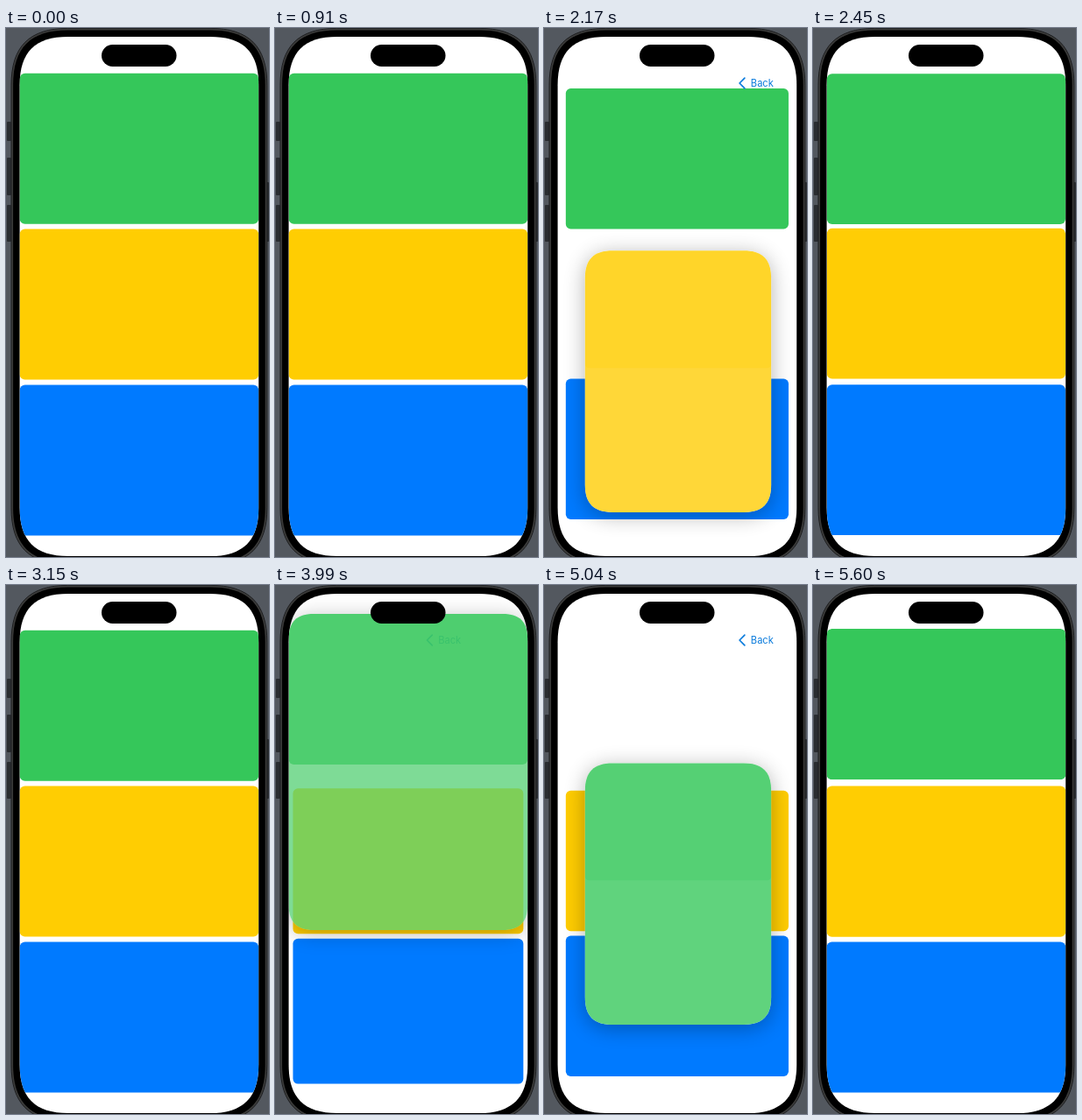
An HTML page that plays this animation: 300 by 604 pixels, repeating every 5670 ms.

```html
<!DOCTYPE html>
<html lang="en">
<head>
<meta charset="utf-8">
<title>Zoom transition</title>
<style>
  html, body { margin: 0; width: 100%; height: 100%; overflow: hidden; background: #53585f; }
  svg { display: block; width: 300px; height: 604px; }
  text { font: 11.1px Inter, Roboto, sans-serif; }
</style>
</head>
<body>
<svg viewBox="0 0 300 604">
  <defs>
    <clipPath id="screenClip"><path class="screen"/></clipPath>
    <clipPath id="cardClip"><path class="card"/></clipPath>
    <clipPath id="outsideClip"><path id="outside" clip-rule="evenodd"/></clipPath>
    <filter id="blur" filterUnits="userSpaceOnUse" x="-60" y="-60" width="420" height="780">
      <feGaussianBlur stdDeviation="12"/>
    </filter>
  </defs>

  <rect width="300" height="604" fill="#53585f"/>
  <g fill="#2a2d31">
    <rect x="1" y="107" width="5" height="22" rx="1"/>
    <rect x="1" y="148" width="5" height="43" rx="1"/>
    <rect x="1" y="202" width="5" height="42" rx="1"/>
    <rect x="297" y="176" width="3" height="68" rx="1"/>
  </g>
  <path id="rim" fill="#3b3b3a" stroke="#1d1e20"/>
  <path id="bezel" fill="#000"/>
  <path class="screen" fill="#fff"/>

  <g clip-path="url(#screenClip)">
    <g id="home"></g>
    <g id="back" fill="#0a7bdc">
      <path d="M7 57.2 1.2 63 7 68.8" fill="none" stroke="#0a7bdc" stroke-width="1.7" stroke-linecap="round" stroke-linejoin="round"/>
      <text x="14" y="67">Back</text>
    </g>
    <g id="zoom">
      <g clip-path="url(#outsideClip)">
        <path class="card" id="shadow" transform="translate(0 4)" filter="url(#blur)"/>
      </g>
      <path class="card" id="backing" fill="#fff"/>
      <path class="card" id="page"/>
      <g clip-path="url(#cardClip)"><rect id="thumb"/></g>
    </g>
  </g>
  <rect x="109" y="19" width="85.5" height="25" rx="12.5"/>
</svg>

<script>
const LOOP = 5670, STEP = 70, CYCLE = 2870;
const OPEN = 1040, DRAG = 1890, RELEASE = 2080, DONE = 2860;
const SCREEN = { x: 15.6, y: 10, w: 272.6, h: 593, r: 46 };
const CX = SCREEN.x + SCREEN.w / 2, CY = SCREEN.y + SCREEN.h / 2;
const CELL_H = 172, CELL_R = 6;
const DROP = { scale: 0.69, cx: 153.4, cy: 439 };

const $ = id => document.getElementById(id);
const all = selector => document.querySelectorAll(selector);
const set = (el, attrs) => Object.entries(attrs).forEach(([k, v]) => el.setAttribute(k, v));
const lerp = (a, b, t) => a + (b - a) * t;

// Rounded rectangle with slightly smoothed corners
function squircle({ x, y, w, h, r }) {
  const e = Math.min(1.2 * r, w / 2, h / 2), c = 0.381 * r;
  const R = x + w, B = y + h;
  return `M${x} ${y + e}C${x} ${y + c} ${x + c} ${y} ${x + e} ${y}` +
    `H${R - e}C${R - c} ${y} ${R} ${y + c} ${R} ${y + e}` +
    `V${B - e}C${R} ${B - c} ${R - c} ${B} ${R - e} ${B}` +
    `H${x + e}C${x + c} ${B} ${x} ${B - c} ${x} ${B - e}Z`;
}

// Both springs return the distance left, from 1 to 0; time in ms
function smooth(ms) {
  const x = 0.019 * Math.max(0, ms);
  return (1 + x) * Math.exp(-x);
}
function bouncy(ms) {
  const t = Math.max(0, ms) / 1000, w = 11, z = 0.8, d = Math.sqrt(1 - z * z);
  return Math.exp(-z * w * t) * (Math.cos(w * d * t) + z / d * Math.sin(w * d * t));
}

const cells = ['#35c75a', '#ffcd02', '#007aff'].map((color, i) => {
  const y = 51.8 + i * 177.8;
  const el = document.createElementNS('http://www.w3.org/2000/svg', 'rect');
  set(el, { x: SCREEN.x, y, width: SCREEN.w, height: CELL_H, rx: CELL_R, fill: color });
  $('home').append(el);
  return { el, color, cy: y + CELL_H / 2 };
});

const inset = (n, r) => squircle({ x: SCREEN.x - n, y: SCREEN.y - n, w: SCREEN.w + 2 * n, h: SCREEN.h + 2 * n, r });
all('.screen').forEach(el => el.setAttribute('d', inset(0, SCREEN.r)));
$('bezel').setAttribute('d', inset(7.5, 52));
$('rim').setAttribute('d', inset(9.6, 54));

// grow: cell shape 0 to page shape 1; slide: navigation bar progress
function pose(t, cell) {
  if (t < DRAG) {
    const p = 1 - smooth(t - OPEN);
    return { scale: 1, cx: CX, cy: lerp(cell.cy, CY, p), grow: p, slide: p, recede: p,
      backing: p ** 1.4, page: 1 - (1 - p) ** 1.7, thumb: (1 - p) ** 0.75 };
  }
  const slide = smooth(t - 2033), recede = bouncy(t - 2110);
  const released = t >= RELEASE;
  const u = (t - DRAG + 30) / (RELEASE - DRAG + 30);
  const k = released ? bouncy(t - RELEASE) : u * u * (3 - 2 * u);
  const grow = smooth(t - RELEASE - 2);
  const rest = released ? cell.cy : CY;
  return { scale: lerp(1, DROP.scale, k), cx: lerp(CX, DROP.cx, k), cy: lerp(rest, DROP.cy, k),
    grow, slide, recede, backing: Math.min(1, grow * 2.1),
    page: 1 - (1 - grow) ** 2.2, thumb: (1 - grow) ** 1.9 };
}

function draw(now) {
  const time = Math.floor(now % LOOP / STEP) * STEP;
  const second = time >= OPEN + CYCLE - 100;
  const t = second ? time - CYCLE : time;
  const cell = cells[second ? 0 : 1];
  const active = t >= OPEN && t < DONE;
  const s = active ? pose(t, cell) : { slide: 0, recede: 0 };

  const homeScale = 1 - 0.08 * s.recede;
  $('home').setAttribute('transform', `translate(${CX} ${CY}) scale(${homeScale}) translate(${-CX} ${-CY})`);
  $('back').setAttribute('transform', `translate(${22 + SCREEN.w * (1 - s.slide)} 0)`);
  cells.forEach(c => c.el.setAttribute('visibility', active && c === cell ? 'hidden' : 'visible'));
  $('zoom').setAttribute('visibility', active ? 'visible' : 'hidden');
  if (!active) return;

  const w = SCREEN.w * s.scale;
  const h = lerp(CELL_H, SCREEN.h, s.grow) * s.scale;
  const x = s.cx - w / 2, y = s.cy - h / 2;
  const path = squircle({ x, y, w, h, r: lerp(CELL_R, SCREEN.r, s.grow) });
  all('.card').forEach(el => el.setAttribute('d', path));
  $('outside').setAttribute('d', `M-60-60H360V720H-60Z${path}`);
  $('shadow').setAttribute('opacity', 0.3 * Math.min(1, s.grow * 2));
  $('backing').setAttribute('opacity', s.backing);
  set($('page'), { fill: cell.color, opacity: s.page });
  set($('thumb'), { x, y, width: w, height: CELL_H * s.scale, rx: CELL_R * s.scale, fill: cell.color, opacity: s.thumb });
}

const start = performance.now();
function tick() {
  draw(performance.now() - start);
  requestAnimationFrame(tick);
}
tick();
</script>
</body>
</html>
```
